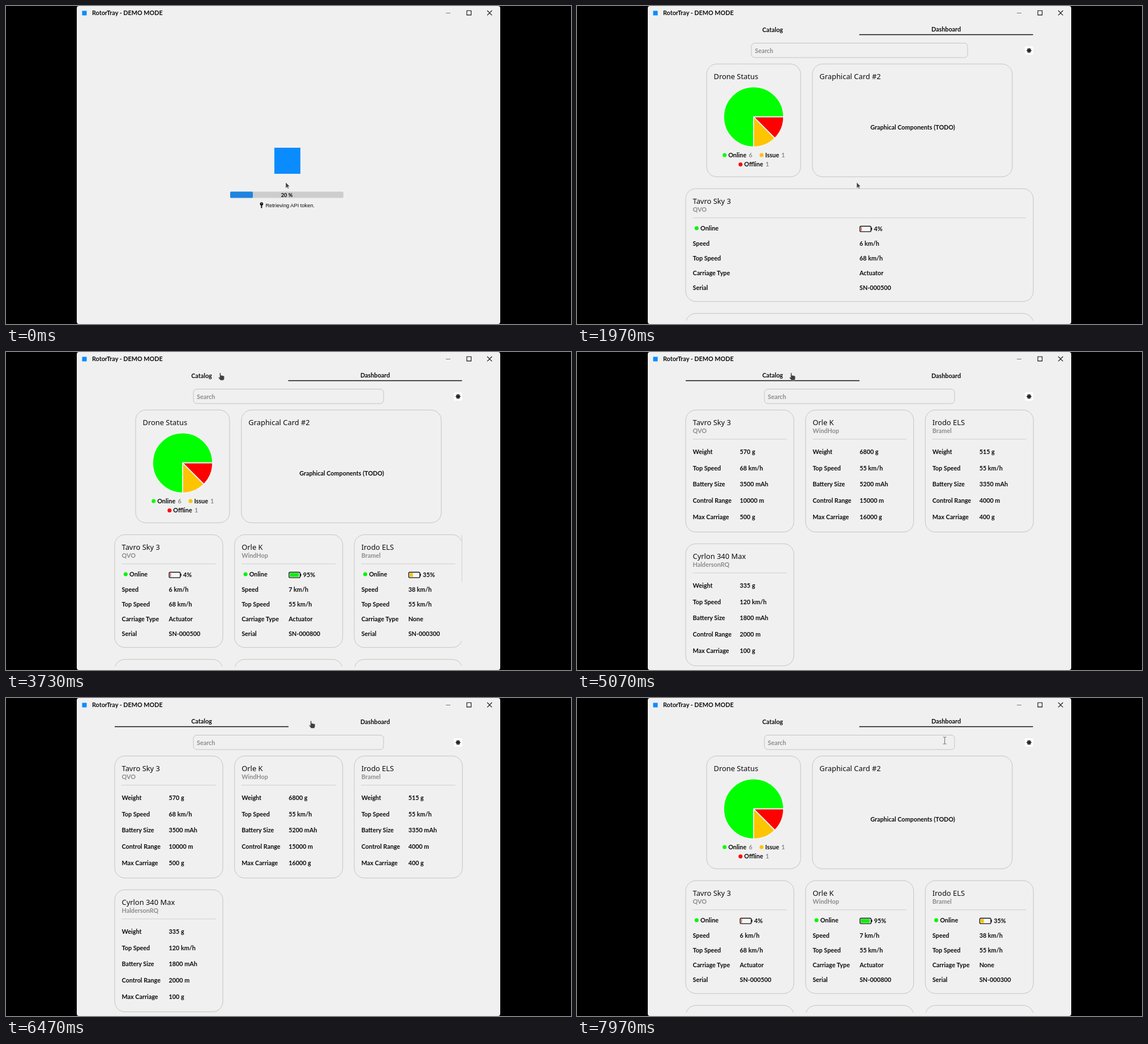
Animation of 998x561 px, one loop 8000 ms. Source, as an HTML page:

```html
<!DOCTYPE html>
<html lang="en">
<head>
<meta charset="utf-8">
<title>RotorTray</title>
<style>
  html, body { margin: 0; width: 100%; height: 100%; overflow: hidden; background: #000; }
  svg { display: block; width: 998px; height: 561px; }
  text { font: 700 10.8px Lato, sans-serif; fill: #0c0c0c; }
  .title { font: 500 12.9px "Noto Sans", sans-serif; }
  .soft { fill: #8c8c8c; }
  .step { font: 400 9.3px "Liberation Sans", Arial, sans-serif; }
  .pct { font-size: 9.3px; }
  .box { fill: none; stroke: #c3c3c1; }
</style>
</head>
<body>
<svg id="stage" viewBox="0 0 998 561"></svg>
<script>
const LOOP = 8000;
const READY = 1970, REFLOW = 2040, TO_CATALOG = 4000, TO_DASH = 6950;
const stage = document.getElementById('stage');

function el(parent, tag, attrs = {}, content) {
  const node = document.createElementNS('http://www.w3.org/2000/svg', tag);
  for (const key in attrs) node.setAttribute(key, attrs[key]);
  if (content !== undefined) node.textContent = content;
  return parent.appendChild(node);
}
const group = (parent, attrs) => el(parent, 'g', attrs);
const rect = (p, x, y, width, height, attrs) => el(p, 'rect', { x, y, width, height, ...attrs });
const dot = (p, cx, cy, r, fill) => el(p, 'circle', { cx, cy, r, fill });
const path = (p, d, attrs) => el(p, 'path', { d, ...attrs });
const show = (node, on) => node.setAttribute('display', on ? 'inline' : 'none');

// y is the middle of the capitals
function label(p, x, y, str, cls = '', anchor = 'start') {
  const drop = cls === 'title' ? 4.6 : cls === 'step' ? 3.3 : 3.8;
  return el(p, 'text', { x, y: y + drop, class: cls, 'text-anchor': anchor }, str);
}

// Window
rect(stage, 125, 0, 748, 561, { rx: 4, fill: '#f0f0f0' });
rect(stage, 134.5, 8.5, 8, 8, { fill: '#0a8cff' });
label(stage, 152, 12.5, 'RotorTray - DEMO MODE');
path(stage, 'M777 12.5h8', { stroke: '#777' });
path(stage, 'M814 8.3h7.6v7.6h-7.6zM850 8l8.4 8.4M858.4 8L850 16.4', { fill: 'none', stroke: '#111', 'stroke-width': 1.1 });

// Loading screen
const boot = group(stage);
rect(boot, 474, 250, 46, 46, { fill: '#0a8cff' });
rect(boot, 396, 327.5, 200, 11, { rx: 1.5, fill: '#cdcdcd' });
const bar = rect(boot, 396, 327.5, 40, 11, { rx: 1.5, fill: '#1e84e0' });
const percent = label(boot, 496, 333, '', 'pct', 'middle');
const step = label(boot, 501.8, 351.3, '', 'step', 'middle');
const keyIcon = group(boot);
path(keyIcon, 'M0 -5a3 3 0 0 1 1 5.8V5l-1 1l-1 -1V.8a3 3 0 0 1 1 -5.8z', { fill: '#111' });
dot(keyIcon, 0, -3, .8, '#f0f0f0');

const STEPS = [
  // start, end, percent, text
  [0, 1, 20, 'Retrieving API token.'],
  [30, 330, 40, 'Retrieving drone types.'],
  [530, 800, 70, 'Retrieving drone list.'],
  [970, 1070, 100, 'Retrieving drone dynamics.'],
  [1330, 1331, 100, 'Retrieving drone statuses.'],
  [1600, 1601, 100, 'Preparing the dashboard and catalog.']
];

// Tabs, search and settings
const app = group(stage);
const tabs = [['Catalog', 345.5, 192], ['Dashboard', 652, 498.5]].map(([name, mid, left]) => ({
  text: label(app, mid, 42, name, '', 'middle'),
  line: rect(app, left, 49.8, 307, 1.5, { fill: '#111' })
}));
const search = rect(app, 331, 65.5, 336, 25.5, { rx: 6, class: 'box' });
const hint = label(app, 337, 79, 'Search', 'soft');
rect(app, 791, 71, 15, 15, { rx: 3, fill: '#fff' });
const gear = group(app, { transform: 'translate(798.5 78.5)', fill: 'none', stroke: '#111' });
el(gear, 'circle', { r: 2.8, 'stroke-width': 1.2 });
for (let a = 0; a < 360; a += 45)
  path(gear, 'M0 0V-4.5', { transform: `rotate(${a})`, 'stroke-width': 1 });

// Cards
function card(p, x, y, w, h, name, maker) {
  rect(p, x, y, w, h, { rx: 18, class: 'box' });
  if (!name) return;
  label(p, x + 12.5, y + 22, name, 'title');
  if (!maker) return;
  label(p, x + 12.5, y + 37, maker, 'soft');
  path(p, `M${x + 12.5} ${y + 51.5}H${x + w - 12.5}`, { stroke: '#cfcfcd' });
}

function rows(p, x, y, w, gap, names, values) {
  names.forEach((name, i) => {
    label(p, x + 12.5, y + i * gap, name);
    label(p, x + w / 2, y + i * gap, values[i]);
  });
}

const COLS = [192, 403.7, 615.2], COL_W = 191;
const MODELS = [
  // name, maker, weight, speed, battery, range, load
  ['Tavro Sky 3', 'QVO', '570 g', '68 km/h', '3500 mAh', '10000 m', '500 g'],
  ['Orle K', 'WindHop', '6800 g', '55 km/h', '5200 mAh', '15000 m', '16000 g'],
  ['Irodo ELS', 'Bramel', '515 g', '55 km/h', '3350 mAh', '4000 m', '400 g'],
  ['Cyrlon 340 Max', 'HaldersonRQ', '335 g', '120 km/h', '1800 mAh', '2000 m', '100 g']
];
const FLEET = [
  // charge, colour, speed, carriage, serial
  [4, '#f04a3c', '6 km/h', 'Actuator', 'SN-000500'],
  [95, '#00f500', '7 km/h', 'Actuator', 'SN-000800'],
  [35, '#fdc400', '38 km/h', 'None', 'SN-000300']
];

const catalog = group(app);
MODELS.forEach(([name, maker, ...values], i) => {
  const x = COLS[i % 3], y = i < 3 ? 102.3 : 338.3;
  card(catalog, x, y, COL_W, 215.3, name, maker);
  rows(catalog, x, y + 73.9, COL_W, 28.7,
    ['Weight', 'Top Speed', 'Battery Size', 'Control Range', 'Max Carriage'], values);
});

const dash = group(app);
card(dash, 229, 102.3, 166, 199, 'Drone Status');
card(dash, 415.8, 102.3, 353, 199, 'Graphical Card #2');
label(dash, 593, 214, 'Graphical Components (TODO)', '', 'middle');

const GREEN = '#00ff00', AMBER = '#fdc400', RED = '#ff0000';
function slice(from, to, fill) {
  const at = deg => {
    const a = deg * Math.PI / 180;
    return `${312 + 53 * Math.cos(a)} ${195.7 + 53 * Math.sin(a)}`;
  };
  path(dash, `M312 195.7L${at(from)}A53 53 0 ${+(to - from > 180)} 1 ${at(to)}z`,
    { fill, stroke: '#f4f4f4', 'stroke-width': 1.8, 'stroke-linejoin': 'round' });
}
slice(90, 360, GREEN);
slice(45, 90, AMBER);
slice(0, 45, RED);
[
  [260.7, 263, GREEN, 'Online', 303.5, 6],
  [326, 263, AMBER, 'Issue', 361, 1],
  [288.8, 279.5, RED, 'Offline', 333, 1]
].forEach(([x, y, color, name, nx, n]) => {
  dot(dash, x, y, 3.5, color);
  label(dash, x + 6.5, y, name);
  label(dash, nx, y, n, 'soft');
});

function droneCard(p, i, x, w) {
  const [charge, color, speed, carriage, serial] = FLEET[i];
  const [name, maker, , top] = MODELS[i];
  const vx = x + w / 2;
  card(p, x, 322.3, w, 199, name, maker);
  dot(p, x + 19.3, 392, 3.5, '#00f500');
  label(p, x + 26, 392.4, 'Online');
  rect(p, vx + .7, 388.5, 19.6, 9.6, { rx: 1.8, fill: '#f6f6f6', stroke: '#111', 'stroke-width': 1.4 });
  rect(p, vx + 20.8, 391, 1.4, 4.6, { rx: .6, fill: '#111' });
  rect(p, vx + 2.2, 390, Math.max(1.6, 16.6 * charge / 100), 6.6, { fill: color });
  label(p, vx + 25.5, 393.5, charge + '%');
  rows(p, x, 419.3, w, 26.05,
    ['Speed', 'Top Speed', 'Carriage Type', 'Serial'], [speed, top, carriage, serial]);
  card(p, x, 542.3, w, 199);
}

const clip = el(el(stage, 'defs'), 'clipPath', { id: 'listClip' });
const listView = rect(clip, 191, 321, 616, 234);
const list = group(dash, { 'clip-path': 'url(#listClip)' });
const wide = group(list), narrow = group(list);
droneCard(wide, 0, 192, 614);
COLS.forEach((x, i) => droneCard(narrow, i, x, COL_W));
const thumb = rect(dash, 800, 322, 6, 83.5, { fill: '#d6d6d6' });

// Pointer, each shape with its hot spot at 0,0
const pointer = group(stage);
const outline = { fill: '#404040', stroke: '#f6f6f6', 'stroke-width': .6, 'stroke-linejoin': 'round' };
const shapes = {
  arrow: path(pointer, 'M0 0V10.4L2.4 8.2L4 11.6L5.7 10.8L4.1 7.5H7.3z', outline),
  hand: path(pointer, 'M-1 .6Q0 -1 1.2 .6V4.2Q2.4 3.6 3.3 4.6Q4.5 4 5.3 5Q6.7 4.6 7.4 6V9.4Q7 11.5 5.8 13H.4Q-1.4 10.8 -3.4 8Q-3.2 6.4 -1 8z', outline),
  beam: path(pointer, 'M-3 -6h2.2L0 -5.4L.8 -6H3M0 -5.4V5.4M-3 6h2.2L0 5.4L.8 6H3', { fill: 'none', stroke: '#777', 'stroke-width': 1.1 })
};
const TRAIL = [
  // time, x, y
  [0, 494, 311], [2400, 494, 311], [2900, 449, 188], [3500, 378.3, 37], [5370, 378.3, 37],
  [6470, 538.3, 40.5], [6850, 650, 42], [7200, 650, 42], [7700, 649.5, 75], [LOOP, 649.5, 75]
];

const clamp = v => Math.min(1, Math.max(0, v));
const mix = (a, b, k) => a + (b - a) * k;

function drawBoot(t) {
  const i = STEPS.findLastIndex(s => t >= s[0]);
  const [start, end, goal, text] = STEPS[i];
  const now = mix(i ? STEPS[i - 1][2] : goal, goal, clamp((t - start) / (end - start)));
  bar.setAttribute('width', now * 2);
  percent.textContent = Math.round(now) + ' %';
  step.textContent = text;
  const left = 501.8 - step.getComputedTextLength() / 2;
  keyIcon.setAttribute('transform', `translate(${left - 7} 351)`);
}

function drawApp(t) {
  const onCatalog = t >= TO_CATALOG && t < TO_DASH;
  const single = t < REFLOW;
  tabs.forEach(({ text, line }, i) => {
    const active = onCatalog === (i === 0);
    show(line, active);
    text.setAttribute('y', active ? 45.4 : 45.8);
  });
  search.setAttribute('x', single ? 308 : 331);
  search.setAttribute('width', single ? 382 : 336);
  hint.setAttribute('x', single ? 314.3 : 337);
  show(catalog, onCatalog);
  show(dash, !onCatalog);
  show(wide, single);
  show(narrow, !single);
  const bulk = single || t >= TO_CATALOG ? 0 : 6.5 * clamp((3900 - t) / 900);
  thumb.setAttribute('x', 806 - bulk);
  thumb.setAttribute('width', bulk);
  listView.setAttribute('width', bulk ? 615 - bulk : 616);
}

function drawPointer(t) {
  const i = TRAIL.findIndex(k => k[0] > t);
  const [t0, x0, y0] = TRAIL[i - 1], [t1, x1, y1] = TRAIL[i];
  const k = (t - t0) / (t1 - t0), x = mix(x0, x1, k), y = mix(y0, y1, k);
  const kind = y > 30 && y < 52 ? 'hand' : y > 65 && y < 91 && x > 331 && x < 667 ? 'beam' : 'arrow';
  for (const name in shapes) show(shapes[name], name === kind);
  pointer.setAttribute('transform', `translate(${x} ${y})`);
}

const begin = performance.now();
function frame() {
  const t = (performance.now() - begin) % LOOP;
  const loading = t < READY;
  show(boot, loading);
  show(app, !loading);
  if (loading) drawBoot(t); else drawApp(t);
  drawPointer(t);
  requestAnimationFrame(frame);
}
frame();
</script>
</body>
</html>
```
